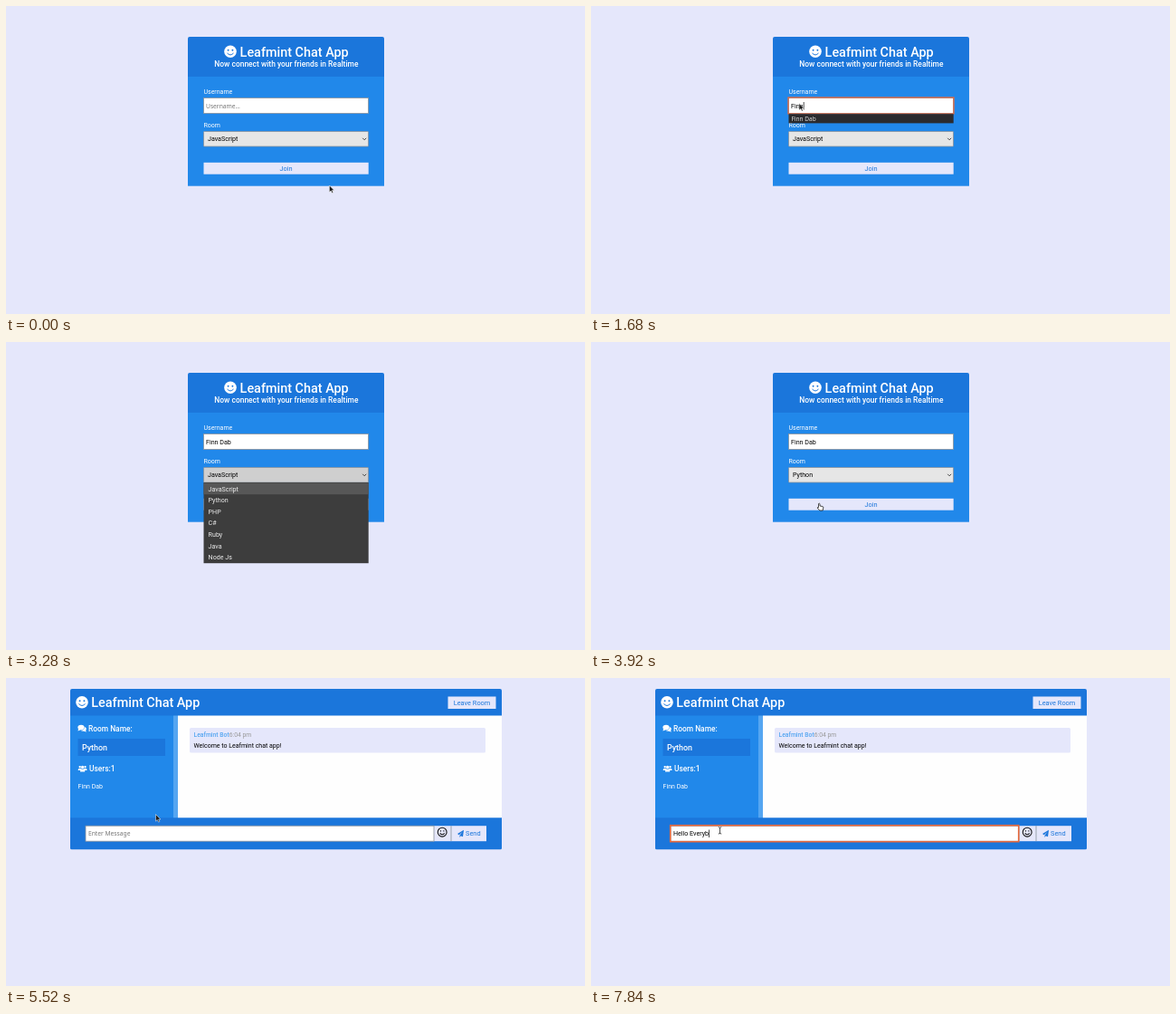
Recreate the animation shown at these times as an HTML page. Size 640 by 340 pixels, loop 8 s.

```html
<!DOCTYPE html>
<html lang="en">
<head>
<meta charset="utf-8">
<title>Chat</title>
<style>
html, body { margin: 0; width: 100%; height: 100%; overflow: hidden; background: #e5e7fb; }
svg { display: block; width: 640px; height: 340px; font: 7px Roboto, sans-serif; }
text { white-space: pre; }
.white { fill: #fff; }
.deep { fill: #1b76db; }
.blue { fill: #2188ea; }
.pale { fill: #e5e7fb; }
.title { font-size: 14.4px; font-weight: 500; fill: #fff; }
.sub { font-size: 8.4px; font-weight: 500; fill: #fff; }
.btn { font-size: 7.4px; fill: #1b76db; }
.field { font-size: 7.1px; }
.hint { font: 6.7px "Noto Sans", sans-serif; fill: #757575; }
.small { font: 6.5px "Noto Sans", sans-serif; fill: #ddd; }
.ring { fill: none; stroke: #e8693c; }
</style>
</head>
<body>
<svg viewBox="0 0 640 340">
  <defs>
    <g id="smile">
      <circle r="6.8" fill="#fff"/>
      <g class="deep"><circle cx="-2.4" cy="-1.5" r=".95"/><circle cx="2.4" cy="-1.5" r=".95"/></g>
      <path d="M-3.5 1.7Q0 5.6 3.5 1.7" fill="none" stroke="#1b76db" stroke-width="1"/>
    </g>
    <g id="person"><circle r="1.6" cy="-2"/><path d="M-2.6 3.2V2Q-2.6 .2 0 .2T2.6 2V3.2Z"/></g>
  </defs>

  <g id="login">
    <rect class="blue" x="201" y="76" width="217" height="122.700"/>
    <path class="deep" d="M201 78V36Q201 34 203 34H416Q418 34 418 36V78Z"/>
    <use href="#smile" x="248" y="50.300"/>
    <text class="title" x="258.600" y="55.900">Leafmint Chat App</text>
    <text class="sub" style="font-size:8.450px" x="230.300" y="66.900">Now connect with your friends in Realtime</text>
    <text class="white" x="218.500" y="97.300">Username</text>
    <rect class="white" x="218.500" y="101.500" width="182" height="17" stroke="#8a929c" stroke-width=".8"/>
    <text id="user" x="221" y="112.600"></text>
    <rect id="userRing" class="ring" x="218" y="101" width="183" height="18" stroke-width="1.300"/>
    <text class="white" x="218.500" y="133.800">Room</text>
    <rect id="select" x="218.500" y="138.500" width="182" height="16.500" rx=".8" stroke="#8a929c" stroke-width=".8"/>
    <text id="room" class="field" x="223" y="149.100"></text>
    <path d="M394.200 145.800L396.200 147.800L398.200 145.800" fill="none" stroke="#333" stroke-width=".9"/>
    <rect class="pale" x="218.500" y="172.800" width="182.200" height="12.900"/>
    <text class="btn" x="302.500" y="181.800">Join</text>
    <g id="suggest">
      <rect x="218.500" y="119.200" width="182.200" height="10.200" fill="#2b2b2e"/>
      <text class="small" x="221.500" y="126.800">Finn Dab</text>
    </g>
    <g id="list">
      <rect x="218.500" y="155" width="182.200" height="89.200" fill="#3d3d3d"/>
      <rect id="pick" x="218.500" width="182.200" height="12.700" fill="#575757"/>
    </g>
  </g>

  <g id="chat">
    <path class="deep" d="M71 42V14Q71 12 73 12H546Q548 12 548 14V42Z"/>
    <use href="#smile" x="84" y="26.800"/>
    <text class="title" x="94.300" y="32">Leafmint Chat App</text>
    <rect class="pale" x="488.500" y="20.500" width="53" height="13.500"/>
    <text class="btn" x="494.700" y="29.800">Leave Room</text>
    <rect class="blue" x="71" y="41.500" width="114" height="113.500"/>
    <rect x="185" y="41.500" width="5" height="113.500" fill="#55a6f1"/>
    <rect x="190" y="41.500" width="358" height="113.500" fill="#fefefe"/>
    <g class="white">
      <ellipse cx="83" cy="54.500" rx="3.600" ry="2.800"/><path d="M80 56L79.500 58.500L83 57Z"/>
      <path d="M87 54A3 2.500 0 0 1 88 58L89 59.500L86 58.700Q83.500 58.700 82.500 57.800Q87 57.500 87 54Z"/>
    </g>
    <text class="sub" x="91" y="58.500">Room Name:</text>
    <rect id="roomBox" class="deep" x="79.500" y="67" width="96.500"/>
    <g id="people">
      <g class="white">
        <use href="#person" transform="translate(81.700 89) scale(.75)"/>
        <use href="#person" transform="translate(87.500 89) scale(.75)"/>
        <use href="#person" x="84.600" y="89.800"/>
      </g>
      <text id="users" class="sub" x="92" y="92.300"></text>
    </g>
    <g id="joined">
      <text x="84" y="79.900" class="white" style="font-size:8.900px;font-weight:500">Python</text>
      <text x="79.600" y="122.200" class="white">Finn Dab</text>
      <rect class="pale" x="203" y="55" width="327" height="27.500" rx="1.500"/>
      <text x="207.500" y="65.300" fill="#999" font-size="6.800"><tspan fill="#55a6f1" font-weight="500">Leafmint Bot</tspan>6:04 pm</text>
      <text x="207.500" y="76.500">Welcome to Leafmint chat app!</text>
    </g>
    <g id="foot">
      <path class="deep" d="M71 127H548V160.500Q548 162 546.500 162H72.500Q71 162 71 160.500Z"/>
      <rect class="pale" x="472" y="136" width="59" height="17"/>
      <path d="M492 136V153" stroke="#8a929c" stroke-width=".8"/>
      <rect id="entry" class="white" x="88" y="136" height="17" stroke="#8a929c" stroke-width=".8"/>
      <text id="message" x="91" y="147"></text>
      <rect id="entryRing" class="ring" x="87.700" y="135.500" width="385" height="18" stroke-width="1.600"/>
      <g id="emoji" transform="translate(482.200 143)" fill="none" stroke="#111" stroke-width="1.100">
        <circle r="4.900"/><path d="M-2.500 1.200Q0 4 2.500 1.200"/>
        <path d="M-1.700 -2V-.700M1.700 -2V-.700"/>
      </g>
      <path class="deep" d="M499 144.700L506 140.500L505 148L502.700 147L501.500 148.700V146.500L504.500 142.500L500.700 146Z"/>
      <text class="btn" x="508" y="147">Send</text>
    </g>
  </g>

  <g id="status">
    <path d="M0 332.500H116.500Q118 332.500 118 334V340H0Z" fill="#323234"/>
    <text class="small" x="55" y="339.400" text-anchor="end">cdnjs.cloudflare.com</text>
  </g>
  <rect id="caret" width=".7" height="8.500"/>
  <g id="mouse">
    <path id="arrow" d="M0 0V7.600L1.800 6L3.100 8.600L4.300 8L3.100 5.500H5.400Z" fill="#1c1c1c" stroke="#fff" stroke-width=".5"/>
    <path id="hand" d="M0 .500Q.900 -.300 1.500 .700V3L4.500 3.500Q5.500 3.700 5.300 5L4.700 8H1.300L-1.500 5Q-1.300 4 0 4.800Z" fill="#fff" stroke="#222" stroke-width=".8"/>
    <path id="beam" d="M-1.700 -.300Q0 -.300 0 .600Q0 -.300 1.700 -.300M0 .500V6.500M-1.700 7Q0 7 0 6.200Q0 7 1.700 7" fill="none" stroke="#222" stroke-width=".8"/>
  </g>
</svg>
<script>
const LOOP = 8000, STEP = 80, NAME = "Finn Dab", GREETING = "Hello Everyb";
const el = {};
document.querySelectorAll("[id]").forEach(e => el[e.id] = e);

["JavaScript", "Python", "PHP", "C#", "Ruby", "Java", "Node Js"].forEach((name, i) => {
  el.list.insertAdjacentHTML("beforeend",
    `<text class="field" fill="#eee" x="223.600" y="${164.500 + i * 12.600}">${name}</text>`);
});

// Pointer stops: time, x, y
const stops = [
  [0, 357.400, 198], [240, 310, 188], [560, 188, 140], [880, 224, 114], [1200, 230, 107.500],
  [1680, 230, 107.500], [1760, 235, 112], [1840, 236, 123], [1920, 238, 124], [2000, 246, 139],
  [2160, 249, 138], [2800, 249, 138], [3680, 241, 172], [3840, 251.500, 178], [4720, 251.500, 178],
  [4800, 255, 181.500], [5040, 255, 181.500], [5440, 165.500, 150.500], [5680, 165.500, 150.500],
  [6240, 142.500, 165], [8000, 142.500, 165]
];

function pointer(t) {
  const i = Math.max(1, stops.findIndex(s => s[0] >= t));
  const [t0, x0, y0] = stops[i - 1], [t1, x1, y1] = stops[i];
  const k = (t - t0) / (t1 - t0);
  return [x0 + (x1 - x0) * k, y0 + (y1 - y0) * k];
}

const show = (e, on) => e.style.display = on ? "" : "none";
const set = (e, attrs) => { for (const k in attrs) e.setAttribute(k, attrs[k]); };

function typed(e, text, hint) {
  e.textContent = text || hint;
  e.setAttribute("class", text ? "field" : "hint");
}

function draw(t) {
  const inside = t >= 4800, ready = t >= 5200;
  const open = t >= 2880 && t < 3680;
  const userFocus = t >= 960 && t < 2800, entryFocus = t >= 6400;

  show(el.login, !inside);
  show(el.chat, inside);
  show(el.status, t >= 4480 && !ready);

  const letters = Math.max(0, Math.min(4, Math.floor((t - 1120) / 120)));
  typed(el.user, NAME.slice(0, t >= 1760 ? 8 : letters), "Username...");
  show(el.userRing, userFocus);
  show(el.suggest, letters > 0 && t < 1760);
  el.room.textContent = t < 3680 ? "JavaScript" : "Python";
  set(el.select, { fill: open ? "#cfcfcf" : "#e6e6e6" });
  show(el.list, open);
  set(el.pick, { y: t < 3440 ? 155.500 : 168.200 });

  show(el.joined, ready);
  show(el.emoji, ready);
  set(el.roomBox, { height: ready ? 19 : 8.500 });
  set(el.people, { transform: `translate(0 ${ready ? 10.600 : 0})` });
  set(el.foot, { transform: `translate(0 ${ready ? 27.200 : 0})` });
  set(el.entry, { width: ready ? 385 : 388 });
  el.users.textContent = ready ? "Users:1" : "Users:";
  const count = t >= 7840 ? 12 : t >= 7680 ? 11 : Math.max(0, Math.min(10, Math.floor((t - 6480) / 80)));
  typed(el.message, GREETING.slice(0, count), "Enter Message");
  show(el.entryRing, entryFocus);

  const box = inside ? el.message : el.user;
  const hasText = inside ? count : letters;
  const blinkOff = t >= 2000 && t < 2480;
  show(el.caret, (userFocus && !blinkOff) || entryFocus);
  set(el.caret, {
    x: +box.getAttribute("x") + (hasText ? box.getComputedTextLength() : 0) + .3,
    y: inside ? 167.500 : 106
  });

  const [x, y] = pointer(t);
  const hand = t >= 3760 && t < 4800, beam = t >= 6160;
  show(el.mouse, !open);
  set(el.mouse, { transform: `translate(${x} ${y})` });
  show(el.hand, hand);
  show(el.beam, beam);
  show(el.arrow, !hand && !beam);
}

const start = performance.now();
function tick() {
  const t = (performance.now() - start) % LOOP;
  draw(Math.floor(t / STEP) * STEP);
  requestAnimationFrame(tick);
}
tick();
</script>
</body>
</html>
```
